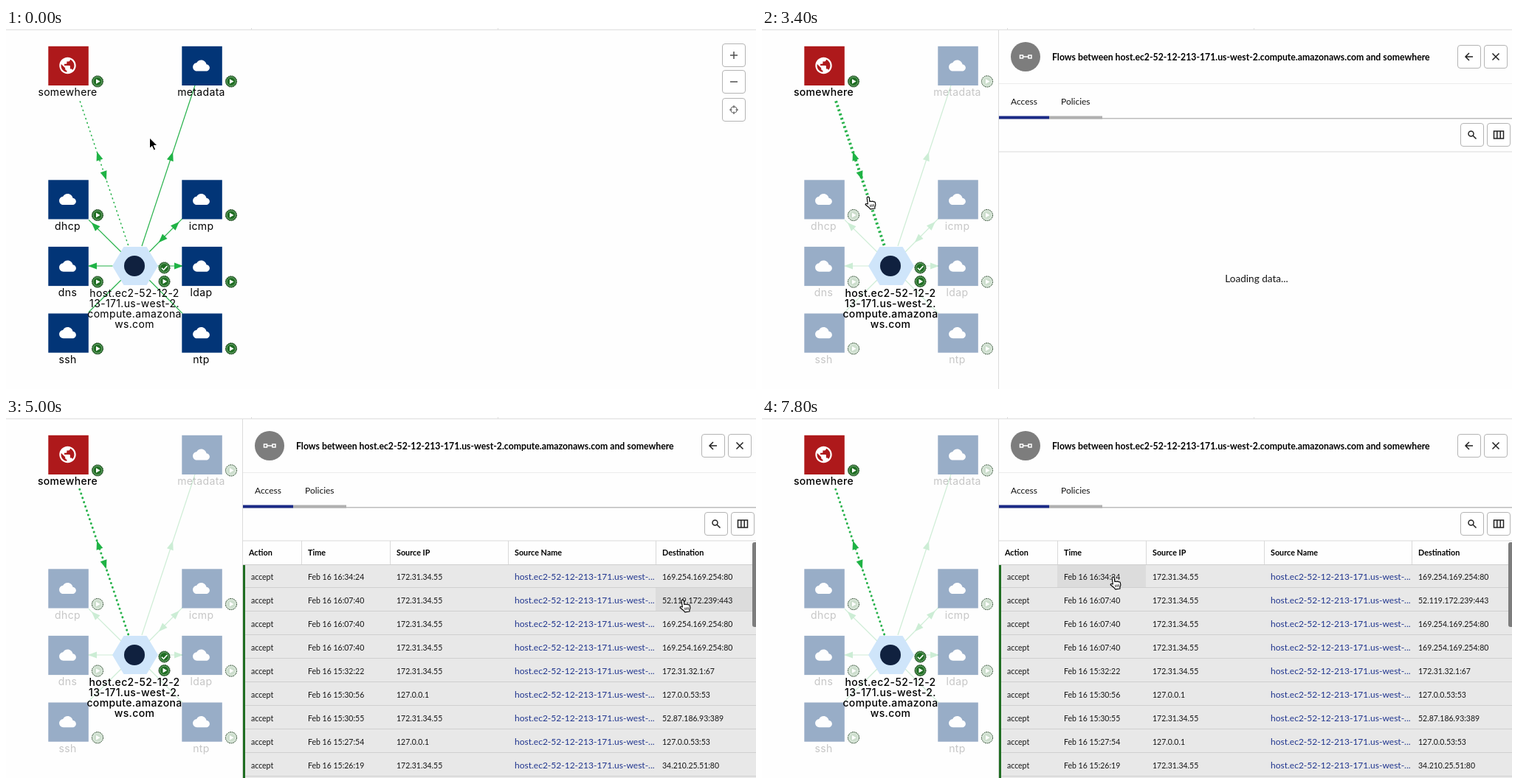
Write an HTML page that moves like this. It is 1016x490 px and loops after 8 s.

```html
<!DOCTYPE html>
<html lang="en">
<head>
<meta charset="utf-8">
<title>Network flows</title>
<style>
  html, body { margin: 0; width: 100%; height: 100%; overflow: hidden; background: #fefefe; }
  svg { display: block; width: 1016px; height: 490px; }
  text { white-space: pre; }
  #graph text { font: 14px Inter, sans-serif; letter-spacing: .35px; text-anchor: middle; }
  #panel text { font: 10.5px Lato, sans-serif; fill: #161616; }
  #panel .title { font-size: 12.25px; font-weight: 700; fill: #000; }
  #panel .head { font-size: 10.8px; font-weight: 700; fill: #000; }
  #panel .tab { font-size: 12px; }
  #panel .link { font-size: 12px; fill: #21368f; }
  #panel .loading { font-size: 13.6px; text-anchor: middle; }
  .edge { stroke: #27b24b; stroke-width: 1.2; fill: none; }
  .arrow { fill: #1fb345; }
  .btn { fill: #fff; stroke: #b4b4b4; }
  .icon { fill: none; stroke: #222; stroke-width: 1.5; }
  .zoom .icon { stroke: #505050; }
  .zoom .thin .icon { stroke-width: 1.1; }
  .selected .dim { opacity: .4; }
  .selected .faint { opacity: .22; }
  .selected .strong { font-weight: 500 !important; }
</style>
</head>
<body>
<svg id="stage" viewBox="0 0 1016 490"></svg>
<script>
const LOOP = 8000, ROW_TOP = 200, ROW_H = 32;
const SELECT_AT = 2550, PANEL_AT = 2770, LOADED_AT = 3550;
const HOST = 'host.ec2-52-12-213-171.us-west-2.compute.amazonaws.com';
const GREEN = '#1f6d22';

const CLOUD = 'M19.35 10.04C18.67 6.59 15.64 4 12 4 9.11 4 6.6 5.64 5.35 8.04 2.34 8.36 0 10.91 0 14c0 3.31 2.69 6 6 6h13c2.76 0 5-2.24 5-5 0-2.64-2.05-4.78-4.65-4.96z';
const GLOBE = 'M12 2C6.48 2 2 6.48 2 12s4.48 10 10 10 10-4.48 10-10S17.52 2 12 2zm-1 17.93c-3.95-.49-7-3.85-7-7.93 0-.62.08-1.21.21-1.79L9 15v1c0 1.1.9 2 2 2v1.93zm6.9-2.54c-.26-.81-1-1.39-1.9-1.39h-1v-3c0-.55-.45-1-1-1H8v-2h2c.55 0 1-.45 1-1V7h2c1.1 0 2-.9 2-2v-.41c2.93 1.19 5 4.06 5 7.41 0 2.08-.8 3.97-2.1 5.39z';

const rect = (x, y, w, h, attrs) => `<rect x="${x}" y="${y}" width="${w}" height="${h}" ${attrs}/>`;
const text = (x, y, str, cls = '') => `<text x="${x}" y="${y}" class="${cls}">${str}</text>`;
const path = (d, attrs) => `<path d="${d}" ${attrs}/>`;
const button = (x, y, icon, cls = '') =>
  rect(x + .5, y + .5, 31, 31, 'rx="3.5" class="btn"') +
  `<g transform="translate(${x + 16} ${y + 16})" class="${cls}">${path(icon, 'class="icon"')}</g>`;

// Graph
function badge(x, y, cls, check) {
  const mark = check
    ? path('M-3.6 .2L-1 2.8 3.8-2.4', 'fill="none" stroke="#fff" stroke-width="1.6"')
    : path('M-2-3.2L3.6 0-2 3.2z', 'fill="#fff"');
  return `<g transform="translate(${x} ${y})">
    <circle r="8" fill="#fff"/>
    <g class="${cls}"><circle r="7.6" fill="${GREEN}"/>
      <circle r="5.9" fill="none" stroke="#fff" stroke-width=".7" opacity=".55"/>${mark}</g>
    <circle r="7.6" fill="none" stroke="#1d3a1e" stroke-width="1" stroke-dasharray="1.6 1"/></g>`;
}

function node(x, y, name, open) {
  const icon = open ? GLOBE : CLOUD, scale = open ? 1.12 : .95;
  return `<g class="${open ? '' : 'dim'}">` +
    rect(x - 26.7, y - 26.2, 54.5, 53.2, `fill="${open ? '#ae191b' : '#023577'}"`) +
    path(icon, `fill="#fff" transform="translate(${x - .5} ${y}) scale(${scale}) translate(-12 -12)"`) + '</g>' +
    text(x - .5, y + 41, name, open ? 'strong' : 'faint') +
    badge(x + 40, y + 21.5, open ? '' : 'faint');
}

function arrow(x, y, angle) {
  return path('M6 0L-6-4.6V4.6z', `class="arrow" transform="translate(${x} ${y}) rotate(${angle})"`);
}

const line = (x1, y1, x2, y2) => path(`M${x1} ${y1}L${x2} ${y2}`, 'class="edge"');

const graph = `<g id="graph">
  <g class="faint">
    ${line(184, 296, 256, 78)}${arrow(224.2, 174, -71.7)}
    ${line(157, 305, 112, 260.4)}${arrow(120, 268.3, -135)}
    ${line(193, 305, 239, 258.6)}${arrow(230.5, 267.2, -45)}${arrow(211, 287, 135)}
    ${line(145, 323, 112, 323)}${arrow(117, 323, 180)}
    ${line(205, 323, 239, 323)}${arrow(234, 323, 0)}
    ${line(157, 341, 112, 385.8)}${line(193, 341, 239, 387.4)}
  </g>
  ${path('M165.600 295L99.400 97', 'id="flow" class="edge"')}
  ${arrow(125, 173.5, -108.5)}${arrow(134, 200.5, 71.5)}
  ${node(84, 51, 'somewhere', true)}${node(265, 51, 'metadata')}
  ${[['dhcp', 'icmp'], ['dns', 'ldap'], ['ssh', 'ntp']].map(([left, right], i) =>
    node(84, 232.5 + i * 90.6, left) + node(265, 232.5 + i * 90.6, right)).join('')}
  ${path('M144 323L159.500 297H190.500L206 323 190.500 349H159.500z', 'fill="#cfe5fa"')}
  <circle cx="174" cy="323" r="14" fill="#10213f"/>
  ${badge(214.5, 325.5, '', true)}${badge(214.5, 344, '')}
  ${['host.ec2-52-12-2', '13-171.us-west-2.', 'compute.amazona', 'ws.com']
    .map((part, i) => text(174, 364.5 + i * 14, part, 'strong')).join('')}
</g>`;

const zoom = `<g class="zoom">
  ${button(970, 21, 'M-5 0H5M0-5V5')}${button(970, 57, 'M-5 0H5')}
  ${button(970, 95, 'M-4.200 0a4.200 4.200 0 108.400 0a4.200 4.200 0 10-8.400 0M-6 0H-2.500M2.500 0H6M0-6V-2.500M0 2.500V6', 'thin')}
</g>`;

// Panel
const COLUMNS = [[321, 'Action'], [400, 'Time'], [520, 'Source IP'], [680, 'Source Name'], [880, 'Destination']];
const LAN = '172.31.34.55', LOCAL = '127.0.0.1', META = '169.254.169.254:80';
const FLOWS = [
  ['16:34:24', LAN, META], ['16:07:40', LAN, '52.119.172.239:443'],
  ['16:07:40', LAN, META], ['16:07:40', LAN, META],
  ['15:32:22', LAN, '172.31.32.1:67'], ['15:30:56', LOCAL, '127.0.0.53:53'],
  ['15:30:55', LAN, '52.87.186.93:389'], ['15:27:54', LOCAL, '127.0.0.53:53'],
  ['15:26:19', LAN, '34.210.25.51:80'],
];

function flowRow([time, source, target], i) {
  const y = ROW_TOP + i * ROW_H, base = y + 20.5;
  return rect(321, y + 31, 695, 1, 'fill="#cfcfcf"') +
    text(332, base, 'accept') + text(409, base, 'Feb 16 ' + time) + text(529, base, source) +
    text(689, base, HOST.slice(0, 31) + '...', 'link') + text(889, base, target);
}

const table = `<g id="table">
  ${COLUMNS.map(([x, name], i) => text(x + (i ? 9 : 8), 188, name, 'head') +
    (i ? rect(x, 168, 1, 32, 'fill="#d9d9d9"') : '')).join('')}
  ${rect(321, ROW_TOP, 695, 290, 'fill="#e8e8e8"')}
  ${rect(0, 0, 0, ROW_H, 'id="hover" fill="#dcdcdc"')}
  ${FLOWS.map(flowRow).join('')}
  ${rect(321, ROW_TOP, 695, 1, 'fill="#cfcfcf"')}
  ${rect(321, ROW_TOP + 1, 3, 289, `fill="${GREEN}"`)}
  ${rect(1011, 170, 8, 115, 'rx="3" fill="#7d7d7d"')}
</g>`;

const panel = `<g id="panel">
  ${rect(320, 3, 696, 487, 'fill="#fefefe"')}${rect(320, 3, 1, 487, 'fill="#dcdcdc"')}
  <circle cx="357" cy="39" r="20" fill="#7d7d7d"/>
  ${path('M349.500 37h4v4h-4zM361 37h4v4h-4zM353.500 39h7.500', 'fill="none" stroke="#fff" stroke-width="1.5"')}
  ${text(393, 43.5, `Flows between ${HOST} and somewhere`, 'title')}
  ${button(942, 23, 'M5 0H-4.500M0-5L-5 0 0 5')}${button(978, 23, 'M-4.500-4.500L4.500 4.500M4.500-4.500L-4.500 4.500')}
  ${rect(321, 75, 695, 1, 'fill="#ececec"')}
  ${text(337, 104, 'Access', 'tab')}${text(405, 104, 'Policies', 'tab')}
  ${rect(321, 122, 695, 1.5, 'fill="#bdbdbd"')}
  ${rect(321, 119.5, 68, 4, 'fill="#1b2a86"')}${rect(389, 119.5, 72, 4, 'fill="#b0b0b0"')}
  ${button(946, 129, 'M-5-1.500a3.500 3.500 0 107 0a3.500 3.500 0 10-7 0M1 1L5.500 5.500')}
  ${button(982, 129, 'M-6.500-5H6.500V5H-6.500zM-2.200-5V5M2.200-5V5')}
  ${rect(321, 167.5, 695, 1, 'fill="#dcdcdc"')}
  ${text(670, 345, 'Loading data...', 'loading')}
  ${table}
</g>`;

const pointer = `<g id="pointer" stroke-linejoin="round">
  ${path('M.5 0V14.500L3.800 11.400 6.200 17 8.700 16 6.300 10.500H11z', 'id="arrow" fill="#000" stroke="#fff"')}
  <g id="hand" fill="#fff" stroke="#000" stroke-width="1.2" transform="translate(.5 .3) rotate(-8) scale(.94)">
    ${path('M-1.600 9V1.400a1.600 1.600 0 013.200 0V7q1.400-1 2.900.4 1.500-.8 2.600.7 2.200-.5 2.200 2V13l-1.600 3.300V18H1l-1.500-2.500-4.600-5q.2-2.200 3.500-.3z')}
    ${path('M1.800 11.500V15M4.100 11.500V15M6.400 11.500V15', 'stroke-width=".9"')}
  </g>
</g>`;

const topRule = rect(0, 2, 1016, 1, 'fill="#dedede"') +
  [332, 666].map(x => rect(x, 0, 1, 3, 'fill="#dedede"')).join('');

document.getElementById('stage').innerHTML = graph + zoom + panel + topRule + pointer;

// Motion
const el = Object.fromEntries(['graph', 'flow', 'panel', 'table', 'hover', 'pointer', 'arrow', 'hand']
  .map(id => [id, document.getElementById(id)]));
const loading = document.querySelector('.loading');
const show = (node, on) => node.setAttribute('visibility', on ? 'inherit' : 'hidden');
const ease = p => p * p * (3 - 2 * p);

const ROUTE = [
  [0, 194, 149], [200, 194, 149], [1200, 145, 227], [1400, 145, 227], [1700, 143, 229],
  [3700, 143, 229], [4800, 916, 248], [5100, 916, 248], [5900, 962, 221],
  [6200, 962, 221], [7700, 475, 217], [LOOP, 475, 217],
];

function pointerAt(t) {
  const i = ROUTE.findIndex(stop => stop[0] > t);
  const [t0, x0, y0] = ROUTE[i - 1], [t1, x1, y1] = ROUTE[i];
  const p = ease((t - t0) / (t1 - t0));
  return [x0 + (x1 - x0) * p, y0 + (y1 - y0) * p];
}

function styleFlow(width, dash, cap) {
  el.flow.style.strokeWidth = width;
  el.flow.style.strokeDasharray = dash;
  el.flow.style.strokeLinecap = cap;
}

function render(t) {
  const [x, y] = pointerAt(t);
  const selected = t >= SELECT_AT, loaded = t >= LOADED_AT;
  const onFlow = Math.abs(x - 100 - (y - 97) / 3) < 8;
  const onTable = loaded && x > 321 && y > ROW_TOP;

  el.graph.setAttribute('class', selected ? 'selected' : '');
  if (onFlow && t > 1500) styleFlow(4, '2.6 3.4', 'butt');
  else if (selected) styleFlow(3, '.1 6', 'round');
  else styleFlow(1.5, '2.3 3.7', 'butt');

  const slide = ease(Math.min(1, Math.max(0, (t - PANEL_AT) / 200)));
  show(el.panel, slide > 0);
  el.panel.setAttribute('transform', `translate(${696 * (1 - slide)} 0)`);
  show(el.table, loaded);
  show(loading, !loaded && slide > 0);

  show(el.hover, onTable);
  if (onTable) {
    const col = COLUMNS.findLastIndex(c => c[0] <= x), left = COLUMNS[col][0];
    const right = col < 4 ? COLUMNS[col + 1][0] : 1016;
    el.hover.setAttribute('x', left);
    el.hover.setAttribute('width', right - left);
    el.hover.setAttribute('y', ROW_TOP + Math.floor((y - ROW_TOP) / ROW_H) * ROW_H);
  }

  el.pointer.setAttribute('transform', `translate(${x} ${y})`);
  show(el.hand, onFlow || onTable);
  show(el.arrow, !onFlow && !onTable);
}

const start = performance.now();
function tick() {
  render((performance.now() - start) % LOOP);
  requestAnimationFrame(tick);
}
tick();
</script>
</body>
</html>
```
